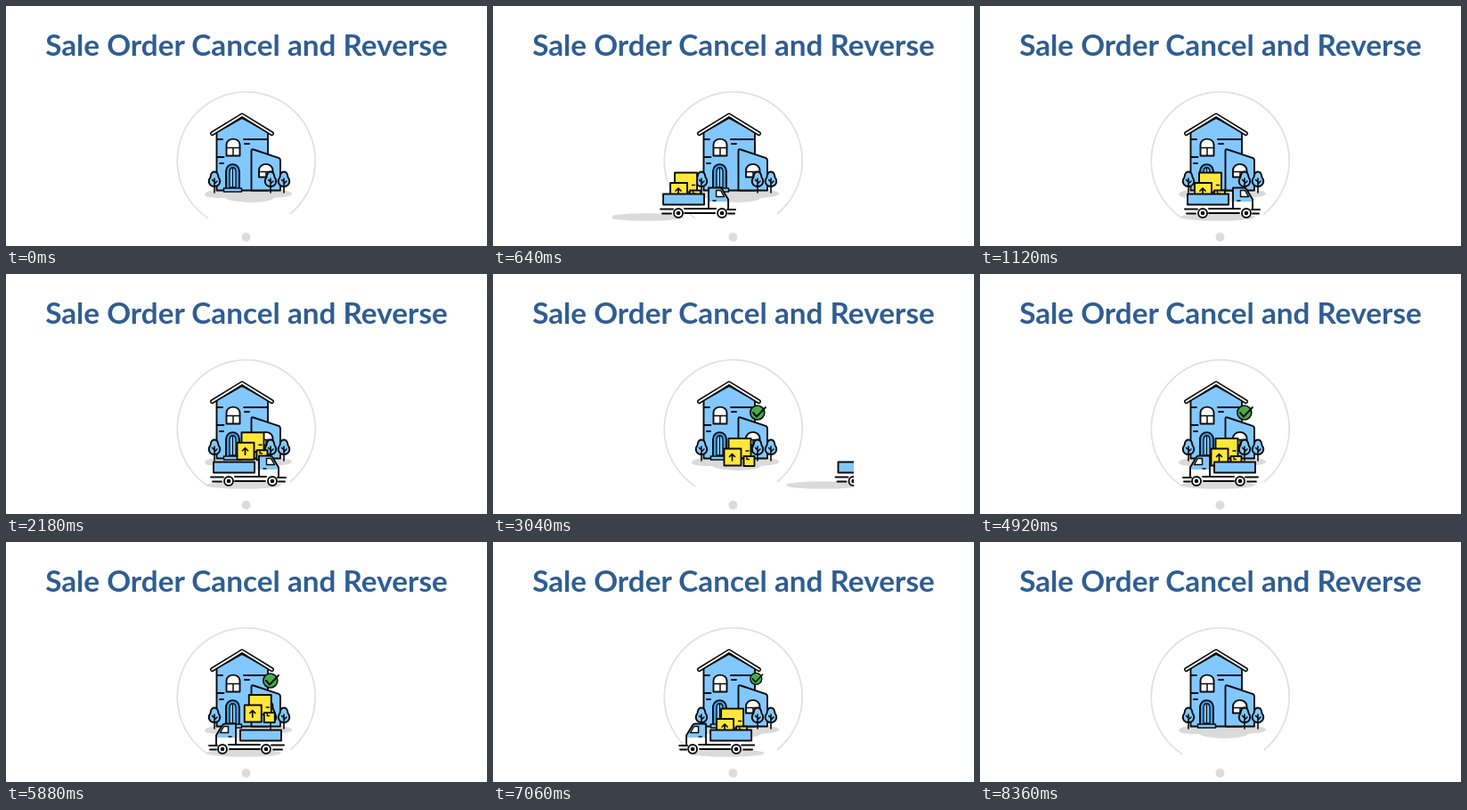
An HTML page that plays this animation: 540x270 px, repeating every 8.4 s.

```html
<!DOCTYPE html>
<html lang="en">
<head>
<meta charset="utf-8">
<title>Sale Order Cancel and Reverse</title>
<style>
  html, body { margin: 0; width: 100%; height: 100%; overflow: hidden; background: #fff; }
  svg { display: block; width: 540px; height: 270px; }
  .title { font: 700 33.3px Lato, sans-serif; fill: #2f5e92; text-anchor: middle; }
  .ink { stroke: #0b0b0b; stroke-width: 1.9; stroke-linecap: round; stroke-linejoin: round; fill: none; }
  .blue { fill: #82c8ff; }
  .deep { fill: #3f9fee; }
  .white { fill: #fff; }
  .yellow { fill: #ffe83b; }
  .shade { fill: #dadada; }
</style>
</head>
<body>
<svg viewBox="0 0 540 270">
  <defs>
    <clipPath id="lane"><rect x="134" y="120" width="271" height="125"/></clipPath>
    <g id="tree" class="ink">
      <path class="blue" d="M0 186.5C4 186.5 4 190 4.500 192.500C8 197 6 203 0 203C-6 203 -8 197 -4.500 192.500C-4 190 -4 186.500 0 186.500Z"/>
      <path d="M0 194V210M0 200l3-3M0 198l-2.500-2.500" stroke-width="1.6"/>
    </g>
  </defs>

  <text class="title" x="270" y="56">Sale Order Cancel and Reverse</text>
  <path d="M227 238.800A77.500 77.500 0 1 1 319 234" fill="none" stroke="#e0e0e0" stroke-width="1.700"/>
  <circle cx="269.500" cy="260" r="5" fill="#dcdcdc"/>

  <!-- House -->
  <path class="shade" d="M223 212C224 207 240 206 272 206S320 207 321 211C321 215 308 215 301 216C294 223 252 222 246 216C236 216 223 216 223 212Z"/>
  <g class="ink">
    <path class="blue" d="M236.500 207.500V142L265 126L294 142V207.500Z"/>
    <path d="M231.500 143.500L265 122.800L298.500 143.500" stroke-width="5"/>
    <path d="M231.500 143.500L265 122.800L298.500 143.500" stroke="#fff" stroke-width="1.900" style="stroke:#fff;stroke-width:1.9"/>
    <path d="M237 150H243M267 150H294M268 155H273M237 170H244.500M240 177H244"/>
    <path class="white" d="M247.500 168.500V156C247.500 147.500 262.500 147.500 262.500 156V168.500Z"/>
    <path d="M247.500 159.500H262.500M255 159.500V168" stroke-width="1.500"/>
    <path class="blue" d="M275.500 207.500V163Q275.500 160.500 278 161.500L306 170.800Q308 171.500 308 174V207.500Z"/>
    <path class="white" d="M284 192.500V185C284 175.500 299.500 175.500 299.500 185V192.500Z"/>
    <path d="M284 186.500H299M292 186.500V192" stroke-width="1.500"/>
    <path class="deep" d="M247 206V186C247 175.500 262 175.500 262 186V206Z"/>
    <path class="blue" d="M251 204V187C251 180 258 180 258 187V204Z" style="stroke-width:1.3"/>
    <path d="M254.500 182V204" style="stroke-width:1.2"/>
    <path class="blue" d="M244.500 205H264.500V209H244.500Z" style="stroke-width:1.5"/>
  </g>
  <use href="#tree" x="234"/>
  <use href="#tree" x="297"/>
  <use href="#tree" x="312"/>

  <g id="check" class="ink">
    <circle cx="296.800" cy="156" r="8" fill="#45ad4b" style="stroke-width:1.6"/>
    <path d="M292 156L296 160.500L306 150"/>
  </g>

  <g clip-path="url(#lane)">
    <ellipse id="shadow" class="shade" cx="267" cy="237.500" rx="42" ry="4.300"/>
    <g id="boxes" class="ink">
      <path class="yellow" d="M264.500 185H289.500V207H264.500Z"/>
      <path d="M284 199H287" style="stroke-width:1.5"/>
      <path class="yellow" d="M281.500 205H293.500V216H281.500Z"/>
      <path d="M285 205V208.500H287.500" style="stroke-width:1.4"/>
      <path class="yellow" d="M259.500 196.500H278.500V215.500H259.500Z"/>
      <path d="M268.500 210V203M265.500 205.500L268.500 202.500L271.500 205.500" style="stroke-width:1.7"/>
    </g>
    <!-- Drawn facing left, centred on x = 0 -->
    <g id="truck" class="ink">
      <path class="white" d="M-35 232V217L-28 206Q-27 204.500 -25 204.500H-13V228H36V232.500Z" style="stroke:none"/>
      <path class="blue" d="M-34.500 217.500L-28 206Q-27 204.500 -25 204.500H-13V220H-34.500Z" style="stroke:none"/>
      <path d="M-35 228V217.500L-28 206Q-27 204.500 -25 204.500H-13V228"/>
      <path class="white" d="M-30.500 214.500L-26.500 207.500H-21.500V214.500Z" style="stroke-width:1.5"/>
      <path d="M-21 219H-18" style="stroke-width:1.5"/>
      <path class="blue" d="M-8 211.500H38V223.500H-8Z"/>
      <path d="M-43 229H-34M-42 233.500H-35M-21 228H14M-20 233H14M27 228.500H41M29 233.500H39"/>
      <circle class="white" cx="-28" cy="233" r="5"/>
      <circle class="white" cx="21" cy="233" r="5"/>
      <circle cx="-28" cy="233" r="1.400" fill="#0b0b0b"/>
      <circle cx="21" cy="233" r="1.400" fill="#0b0b0b"/>
    </g>
  </g>
</svg>
<script>
const LOOP = 8400, FAR = 185, LAG = 52;
const part = id => document.getElementById(id);
const [truck, shadow, boxes, check] = ["truck", "shadow", "boxes", "check"].map(part);
const span = (t, from, to) => Math.min(1, Math.max(0, (t - from) / (to - from)));
const smooth = p => p * p * (3 - 2 * p);
const backIn = (p, s) => p * p * ((s + 1) * p - s);
const backOut = (p, s) => 1 - backIn(1 - p, s);
const ease = (t, from, to) => smooth(span(t, from, to));

const arrive = (t, start) => 1 - backOut(span(t, start, start + 420), 1.2);
const depart = (t, start) => 0.00185 * Math.max(0, t - start) ** 2;

function truckX(t) {
  if (t < 2000) return -FAR * arrive(t, 530);
  if (t < 3600) return Math.min(FAR, depart(t, 2752));
  if (t < 6000) return FAR * arrive(t, 4042);
  return -Math.min(FAR, depart(t, 6960));
}

function boxOffset(t) {
  if (t < 4000) {
    const x = -18.5 * (1 - ease(t, 1700, 2050));
    const y = 2.5 - 15.5 * ease(t, 1350, 1700) + 13 * ease(t, 2020, 2350);
    return [x + (t < 1300 ? truckX(t) : 0), y];
  }
  const x = 10.5 * ease(t, 5600, 6000);
  const y = -13 * ease(t, 5200, 5600) + 15.5 * ease(t, 6100, 6500);
  return [x + (t > 6500 ? truckX(t) : 0), y];
}

function checkScale(t) {
  return t < 5000
    ? backOut(span(t, 2370, 2720), 1.7)
    : Math.max(0, 1 - backIn(span(t, 6835, 7135), 1.7));
}

function draw(t) {
  const flip = t < 3600 ? -1 : 1;
  truck.setAttribute("transform", `translate(${271 + truckX(t)}) scale(${flip} 1)`);
  shadow.setAttribute("transform", `translate(${truckX(t - LAG)})`);
  boxes.setAttribute("transform", `translate(${boxOffset(t)})`);
  check.setAttribute("transform", `translate(289 145) scale(${checkScale(t)}) translate(-289 -145)`);
}

const begin = performance.now();
function tick() {
  draw((performance.now() - begin) % LOOP);
  requestAnimationFrame(tick);
}
tick();
</script>
</body>
</html>
```
